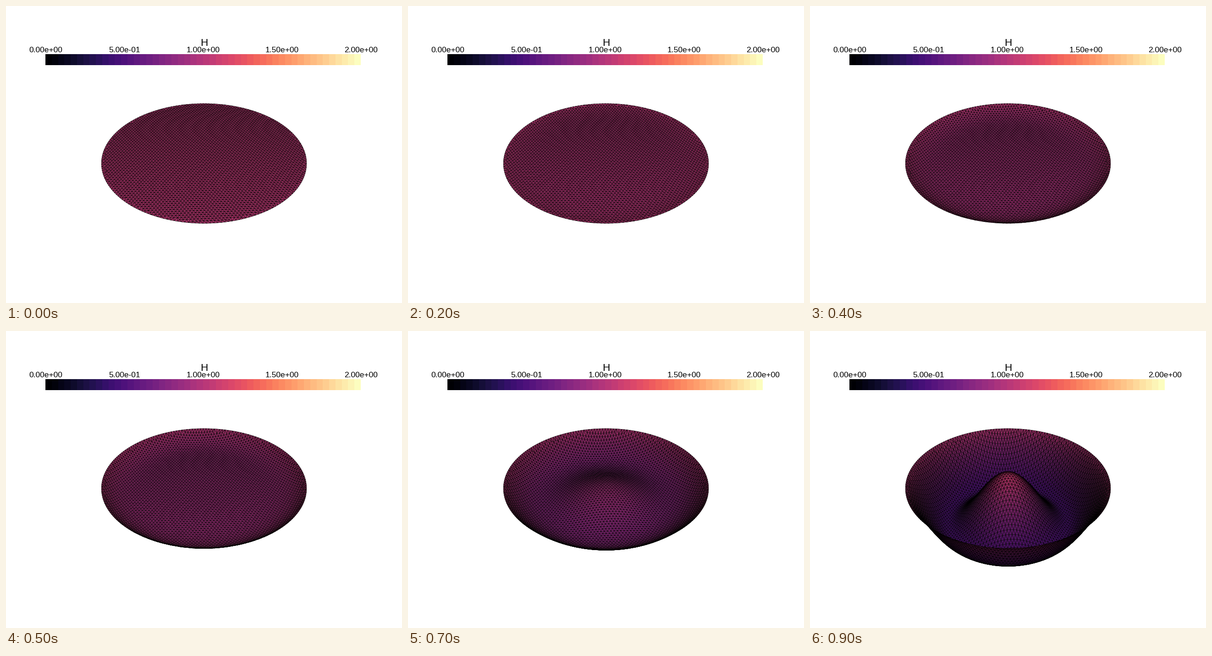
Animation, 864 px wide and 648 px high, one loop 1000 ms. Source, as a matplotlib script:

```python
import numpy as np
import matplotlib
import matplotlib.pyplot as plt
from matplotlib.animation import FuncAnimation
from matplotlib.collections import PolyCollection
from matplotlib.patches import Rectangle
from matplotlib.tri import Triangulation

W, H, DPI = 864, 648, 100
PX = 72 / DPI
FRAMES, INTERVAL = 10, 100
LAST = FRAMES - 1
MAGMA = matplotlib.colormaps["magma"]

# Isometric perspective camera that fits the unit disc's bounding box
VIEW_ANGLE = np.radians(15)
DISTANCE = np.sqrt(2) / np.sin(VIEW_ANGLE)
FOCAL = H / 2 / np.tan(VIEW_ANGLE)
SIN_E, COS_E = np.sqrt(1 / 3), np.sqrt(2 / 3)

TROUGH_Q = 0.375  # squared radius of the ring-shaped trough

# Camera-space directions and colours of the key, fill and head lights
LIGHTS = [
    ((0.11, 0.766, 0.633), (0.75, 0.73, 0.68)),
    ((-0.045, -0.966, 0.255), (0.24, 0.24, 0.25)),
    ((0, 0, 1), (0.25, 0.25, 0.25)),
]

BAR_X, BAR_Y, BAR_W, BAR_H, BANDS = 86, 105, 688, 24, 50


def make_mesh(edge=0.031, tilt=-0.06):
    """Hexagonal lattice inside the disc, with evenly spaced rim points."""
    n = int(1 / edge) + 4
    i, j = np.meshgrid(np.arange(-n, n + 1), np.arange(-2 * n, 2 * n + 1))
    x = (edge * (i + 0.5 * (j % 2))).ravel()
    y = (edge * np.sqrt(0.75) * j).ravel()
    x, y = (x * np.cos(tilt) - y * np.sin(tilt),
            x * np.sin(tilt) + y * np.cos(tilt))
    inside = np.hypot(x, y) < 1 - 0.65 * edge
    angle = np.linspace(0, 2 * np.pi, round(2 * np.pi / edge), endpoint=False)
    x = np.r_[x[inside], np.cos(angle)]
    y = np.r_[y[inside], np.sin(angle)]
    return x, y, Triangulation(x, y).triangles


def depths(step, rate=0.42):
    """Centre and trough heights: the film sags, then a bump grows."""
    growth = 0.537 * np.expm1(rate * step) / np.expm1(rate * LAST)
    sag = 0.04 * np.sin(np.pi * step / LAST) ** 2
    bump = 0.6 * (max(step - 5, 0) / (LAST - 5)) ** 2.2
    trough = -growth - sag
    return trough + bump, trough


def height(q, centre, trough):
    """Radial profile, zero at the rim, with its extremum at TROUGH_Q."""
    t = TROUGH_Q
    p = trough / (1 - t)
    slope = p / (1 - t)
    c = (slope * t - p + centre) / t**2
    b = slope - 2 * c * t
    return (1 - q) * (centre + b * q + c * q**2)


def shade(values, normals):
    light = sum(np.clip(normals @ np.array(d), 0, None)[:, None] * np.array(k)
                for d, k in LIGHTS)
    return np.clip(MAGMA(values / 2)[:, :3] * light, 0, 1)


def surface(step):
    z = height(mesh_x**2 + mesh_y**2, *depths(step))
    cam = np.column_stack([mesh_x,
                           COS_E * z - SIN_E * mesh_y,
                           COS_E * mesh_y + SIN_E * z])
    # mesh_y points toward the viewer
    scale = FOCAL / (DISTANCE - cam[:, 2])
    screen = np.column_stack([W / 2 + cam[:, 0] * scale,
                              H / 2 - cam[:, 1] * scale])
    corners = cam[triangles]
    to_eye = np.array([0, 0, DISTANCE]) - corners.mean(axis=1)
    normal = np.cross(corners[:, 1] - corners[:, 0],
                      corners[:, 2] - corners[:, 0])
    normal /= np.linalg.norm(normal, axis=1)[:, None]
    normal *= np.where((normal * to_eye).sum(axis=1) < 0, -1, 1)[:, None]
    colors = shade(1 + z[triangles].mean(axis=1), normal)
    order = np.argsort(-np.linalg.norm(to_eye, axis=1))
    return screen[triangles][order], colors[order]


mesh_x, mesh_y, triangles = make_mesh()

fig = plt.figure(figsize=(W / DPI, H / DPI), dpi=DPI, facecolor="white")
ax = fig.add_axes([0, 0, 1, 1])
ax.set(xlim=(0, W), ylim=(H, 0))
ax.axis("off")


def label(x, y, text, size):
    ax.text(x, y, text, size=size * PX, family="Liberation Sans",
            color="black", ha="center", va="baseline")


band_w = BAR_W / BANDS
for k in range(BANDS):
    ax.add_patch(Rectangle((BAR_X + k * band_w, BAR_Y), band_w, BAR_H, lw=0,
                           color=MAGMA(k / (BANDS - 1)), antialiased=False))

label(432.5, 87, "H", 22.5)
for k in range(5):
    label(BAR_X + 0.5 + k * BAR_W / 4, 101, f"{k / 2:.2e}", 17.4)

film = PolyCollection([], edgecolors="black", linewidths=0.62 * PX,
                      antialiaseds=True, joinstyle="round")
ax.add_collection(film, autolim=False)


def draw(step):
    polygons, colors = surface(step)
    film.set_verts(polygons)
    film.set_facecolor(colors)
    return [film]


anim = FuncAnimation(fig, draw, frames=FRAMES, interval=INTERVAL,
                     repeat=True, repeat_delay=0, blit=False)
plt.show()
```
